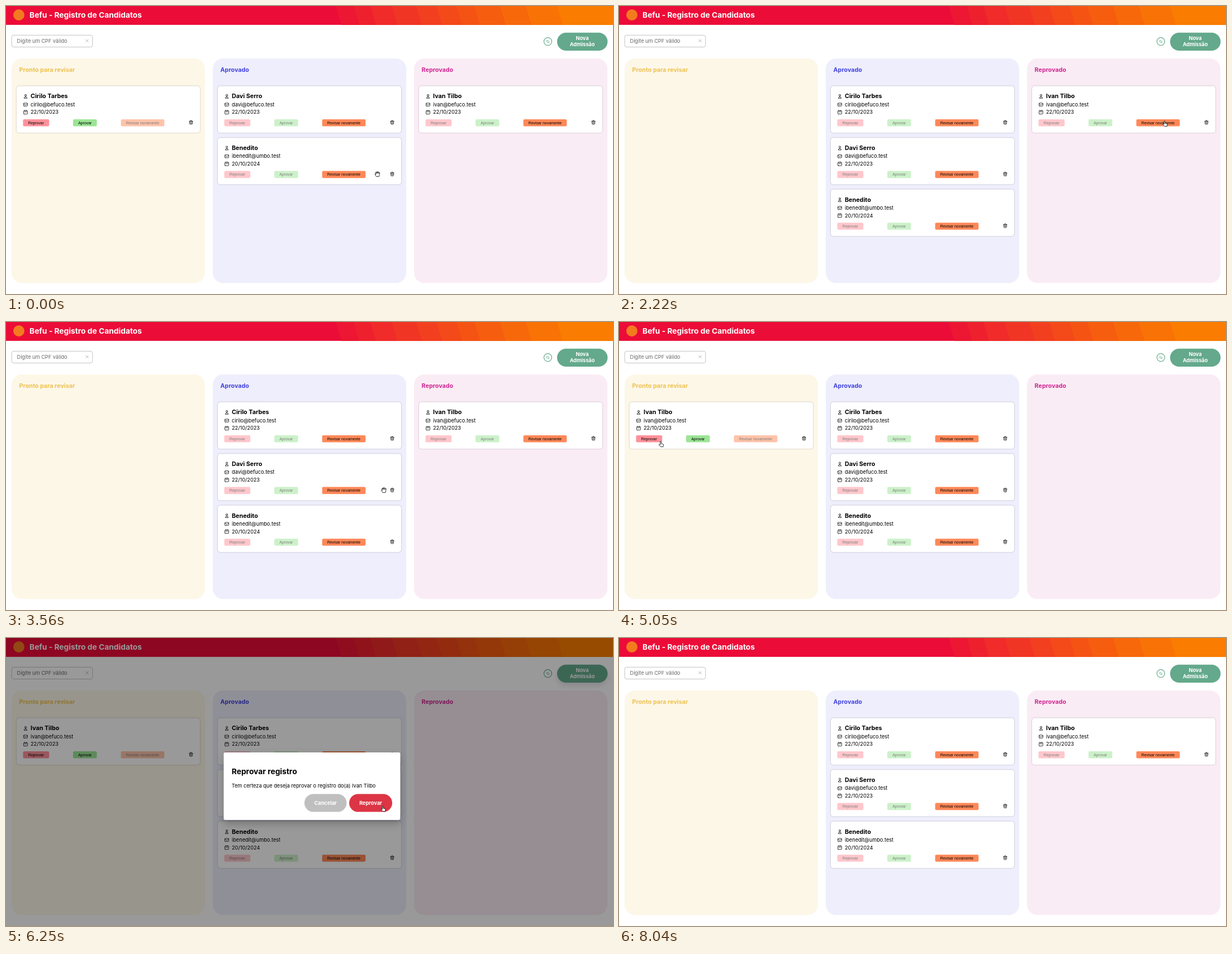
An HTML page that plays this animation: 1086 by 516 pixels, repeating every 8.49 s.

```html
<!DOCTYPE html>
<html lang="pt-BR">
<head>
<meta charset="utf-8">
<title>Registro de Candidatos</title>
<style>
  html, body { margin: 0; width: 100%; height: 100%; overflow: hidden; background: #fff; }
  svg { display: block; }
  text { font-family: Inter, sans-serif; white-space: pre; }
  .b { font-weight: 700; }
  .mid { text-anchor: middle; }
  .small { font-family: "Liberation Sans", Arial, sans-serif; }
  .icon { fill: none; stroke: #000; stroke-width: 2; stroke-linecap: round; stroke-linejoin: round; }
  .card { filter: drop-shadow(0 .7px .8px rgba(0, 0, 0, .28)); }
  .box { filter: drop-shadow(0 7px 7px rgba(0, 0, 0, .22)); }
  .hand { fill: #fff; stroke: #000; stroke-width: .8; stroke-linejoin: round; }
</style>
</head>
<body>
<svg id="stage" width="1086" height="516" viewBox="0 0 1086 516"></svg>
<script>
const LOOP = 8490, STEP = 149;
const COL = 360, ROW = 92.6, CARD = { x: 19, y: 143.6, w: 328, h: 83.4 };

const ICONS = {
  user: 'M16 7a4 4 0 1 1-8 0 4 4 0 0 1 8 0zM12 14a7 7 0 0 0-7 7h14a7 7 0 0 0-7-7z',
  mail: 'M3 8l7.9 5.3a2 2 0 0 0 2.2 0L21 8M5 19h14a2 2 0 0 0 2-2V7a2 2 0 0 0-2-2H5a2 2 0 0 0-2 2v10a2 2 0 0 0 2 2z',
  date: 'M8 7V3m8 4V3m-9 8h10M5 21h14a2 2 0 0 0 2-2V7a2 2 0 0 0-2-2H5a2 2 0 0 0-2 2v12a2 2 0 0 0 2 2z',
  trash: 'M19 7l-.9 12.1a2 2 0 0 1-2 1.9H7.9a2 2 0 0 1-2-1.9L5 7m5 4v6m4-6v6m1-10V4a1 1 0 0 0-1-1h-4a1 1 0 0 0-1 1v3M4 7h16',
  sync: 'M4 4v5h.6m15.3 2A8 8 0 0 0 4.6 9H9m11 11v-5h-.6a8 8 0 0 1-15.3-2m15.3 2H15'
};

const CURSORS = {
  arrow: '<path d="M0 0V9.2L2.1 7.3 3.5 10.4 4.9 9.8 3.5 6.7H6.4Z" stroke="#fff" stroke-width=".7"/>',
  pointer: '<path class="hand" d="M-.8 .8a.9 .9 0 0 1 1.8 0V4l3 .7q1 .3 .9 1.4L4.4 9.7H.2L-2.8 6.4q-.6-1 .4-1.2L-.8 6Z"/>',
  grab: '<path class="hand" d="M-2 4.6L-4.4 .8q-.2-1.2 1-.8L-2.6 .8-3.6-2.4q.3-1.2 1.3-.6L-1.5-1-1.4-4q.7-1 1.4 0L.2-1.2 .9-3.8q.9-.8 1.4 .2L2-.8 3-2.5q1.1-.5 1.2 .5L3.4 2 2.8 4.6Z"/>'
};

const COLUMNS = [
  { title: 'Pronto para revisar', bg: '#fdf7e8', color: '#efc24d' },
  { title: 'Aprovado', bg: '#eeeefc', color: '#4242df' },
  { title: 'Reprovado', bg: '#faecf5', color: '#ce2893' }
];

const ACTIONS = [
  { label: 'Reprovar', x: 11.5, w: 46.7, color: '#ff919a' },
  { label: 'Aprovar', x: 101, w: 42.5, color: '#9be595' },
  { label: 'Revisar novamente', x: 186.6, w: 77.7, color: '#ff8858' }
];

const PEOPLE = {
  C: ['Cirilo Tarbes', 'cirilo@befuco.test', '22/10/2023'],
  D: ['Davi Serro', 'davi@befuco.test', '22/10/2023'],
  B: ['Benedito', 'ibenedit@umbo.test', '20/10/2024'],
  I: ['Ivan Tilbo', 'ivan@befuco.test', '22/10/2023']
};

// Board contents from each time on, one string of people per column
const BOARDS = [
  [0, ['C', 'DB', 'I']],
  [140, ['', 'CDB', 'I']],
  [3710, ['I', 'CDB', '']],
  [6540, ['', 'CDB', 'I']]
];

const MODALS = [
  { from: 2670, to: 3560, verb: 'Revisar', w: 70, color: '#ff8858' },
  { from: 5500, to: 6400, verb: 'Reprovar', w: 77, color: '#dc3545' }
];

// Pointer moves: start, number of steps, end x, end y
const START = [664.5, 301];
const MOVES = [
  [440, 1, 653, 314], [590, 3, 654, 320.5], [1180, 1, 659, 319],
  [1470, 6, 976, 206], [2820, 4, 676, 301],
  [4010, 1, 560, 307], [4160, 2, 161.5, 252], [4600, 5, 64.5, 209.5],
  [5650, 5, 674, 301], [7740, 2, 1066, 507], [8040, 1, 1100, 540]
];

const text = (x, y, size, str, attrs = '') =>
  `<text x="${x}" y="${y}" font-size="${size}" ${attrs}>${str}</text>`;
const rect = (x, y, w, h, r, fill, attrs = '') =>
  `<rect x="${x}" y="${y}" width="${w}" height="${h}" rx="${r}" fill="${fill}" ${attrs}/>`;
const icon = (name, cx, cy, scale = .383, attrs = '') =>
  `<path class="icon" d="${ICONS[name]}" transform="translate(${cx} ${cy}) scale(${scale}) translate(-12 -12)" ${attrs}/>`;
const pill = (x, y, w, label, fill) =>
  rect(x, y, w, 32.1, 16, fill) + text(x + w / 2, y + 19.4, 9.2, label, 'class="b mid" fill="#fff"');
const inside = (px, py, x, y, w, h) => px >= x && px <= x + w && py >= y && py <= y + h;
const enabled = (col, action) => (col === 0) === (action < 2);

function header() {
  const edges = [590, 622, 652, 690, 734, 770, 806, 838, 884, 930, 986];
  const bands = edges.map((x, i) => {
    const k = (i + 1) / edges.length;
    const mix = (a, b) => Math.round(a + (b - a) * k);
    return `<path d="M${x} 0H1086V34H${x + 10}Z" fill="rgb(${mix(236, 250)},${mix(12, 124)},${mix(56, 0)})"/>`;
  });
  return rect(0, 0, 1086, 33.8, 0, '#ec0c38') +
    `<g clip-path="inset(0)">${bands.join('')}</g>` +
    '<circle cx="23" cy="16" r="10" fill="#f47a20"/>' +
    text(42, 20.6, 13.8, 'Befu - Registro de Candidatos', 'class="b" fill="#fff"');
}

function toolbar() {
  return rect(10.2, 52.3, 144.6, 21.2, 3.5, '#fff', 'stroke="#bdbdbd" stroke-width=".9"') +
    text(19.5, 66, 9.2, 'Digite um CPF válido', 'fill="#686868"') +
    '<path d="M142.6 59.8l5 5m0-5l-5 5" stroke="#a5a5a5" stroke-width=".8"/>' +
    '<circle cx="969.4" cy="63.6" r="7" fill="none" stroke="#64a98c" stroke-width="1.2"/>' +
    icon('sync', 969.4, 63.6, .26, 'style="stroke:#64a98c;stroke-width:2.6"') +
    rect(986, 47.8, 90.3, 32.1, 16, '#64a98c', 'id="add"') +
    ['Nova', 'Admissão'].map((s, i) => text(1031, 61.4 + i * 10.6, 9.2, s, 'class="b mid" fill="#fff"')).join('');
}

function columns() {
  return COLUMNS.map((c, i) =>
    rect(10 + COL * i, 94, 346, 402.3, 18.4, c.bg) +
    text(23.6 + COL * i, 118, 10.75, c.title, `class="b" fill="${c.color}"`)).join('');
}

function card(id, col, row) {
  const [name, mail, date] = PEOPLE[id];
  const buttons = ACTIONS.map((a, i) =>
    `<g opacity="${enabled(col, i) ? 1 : .5}">` + rect(a.x, 59.4, a.w, 12.6, 2.3, a.color) +
    text(a.x + a.w / 2, 68.1, 6.89, a.label, 'class="small mid"') + '</g>').join('');
  return `<g transform="translate(${CARD.x + COL * col} ${CARD.y + ROW * row})">` +
    rect(0, 0, CARD.w, CARD.h, 4.6, '#fff', 'class="card"') +
    icon('user', 16, 18.3) + text(25, 21.8, 10.75, name, 'class="b"') +
    icon('mail', 16, 33) + text(25, 36.3, 9.2, mail) +
    icon('date', 16, 46.5) + text(25, 49.9, 9.2, date) +
    buttons + icon('trash', 312, 64.8) + '</g>';
}

function modal(m) {
  const x = 691 - m.w;
  return rect(0, 0, 1086, 516, 0, '#000', 'opacity=".4"') +
    rect(389.5, 205, 315.8, 121, 2.4, '#fff', 'class="box"') +
    text(403.8, 244.3, 13.8, m.verb + ' registro', 'class="b"') +
    text(403.8, 268.3, 9.2, `Tem certeza que deseja ${m.verb.toLowerCase()} o registro do(a) ${PEOPLE.I[0]}`) +
    pill(x - 80.1, 279.5, 75.5, 'Cancelar', '#bfbfbf') + pill(x, 279.5, m.w, m.verb, m.color);
}

function pointerAt(t) {
  let [x, y] = START;
  for (const [from, steps, tx, ty] of MOVES) {
    if (t < from) break;
    const k = Math.min(steps, Math.floor((t - from) / STEP) + 1) / steps;
    const e = k * k * (3 - 2 * k);
    x += (tx - x) * e;
    y += (ty - y) * e;
  }
  return [x, y];
}

function cursorKind(x, y, board, open) {
  if (open) return inside(x, y, 691 - open.w - 80.1, 279.5, open.w + 80.1, 32.1) ? 'pointer' : 'arrow';
  for (let col = 0; col < 3; col++) {
    for (let row = 0; row < board[col].length; row++) {
      const px = x - CARD.x - COL * col, py = y - CARD.y - ROW * row;
      if (!inside(px, py, 0, 0, CARD.w, CARD.h)) continue;
      const onButton = ACTIONS.some((a, i) => enabled(col, i) && inside(px, py, a.x, 59.4, a.w, 12.6));
      return onButton || inside(px, py, 307, 60, 10, 10) ? 'pointer' : 'grab';
    }
  }
  return 'arrow';
}

const $ = id => document.getElementById(id);
$('stage').innerHTML = header() + toolbar() + columns() +
  '<g id="cards"></g><g id="modal"></g><g id="cursor"></g>';

const shown = {};
function put(id, html) {
  if (shown[id] !== html) $(id).innerHTML = shown[id] = html;
}

function draw() {
  const t = performance.now() % LOOP;
  const board = BOARDS.filter(b => t >= b[0]).pop()[1];
  const open = MODALS.find(m => t >= m.from && t < m.to);
  const [x, y] = pointerAt(t);
  put('cards', board.map((ids, col) => [...ids].map((id, row) => card(id, col, row)).join('')).join(''));
  put('modal', open ? modal(open) : '');
  put('cursor', CURSORS[cursorKind(x, y, board, open)]);
  $('cursor').setAttribute('transform', `translate(${x} ${y})`);
  $('add').style.filter = open ? 'drop-shadow(0 5px 5px rgba(12, 0, 46, .12))' : '';
  requestAnimationFrame(draw);
}
draw();
</script>
</body>
</html>
```
